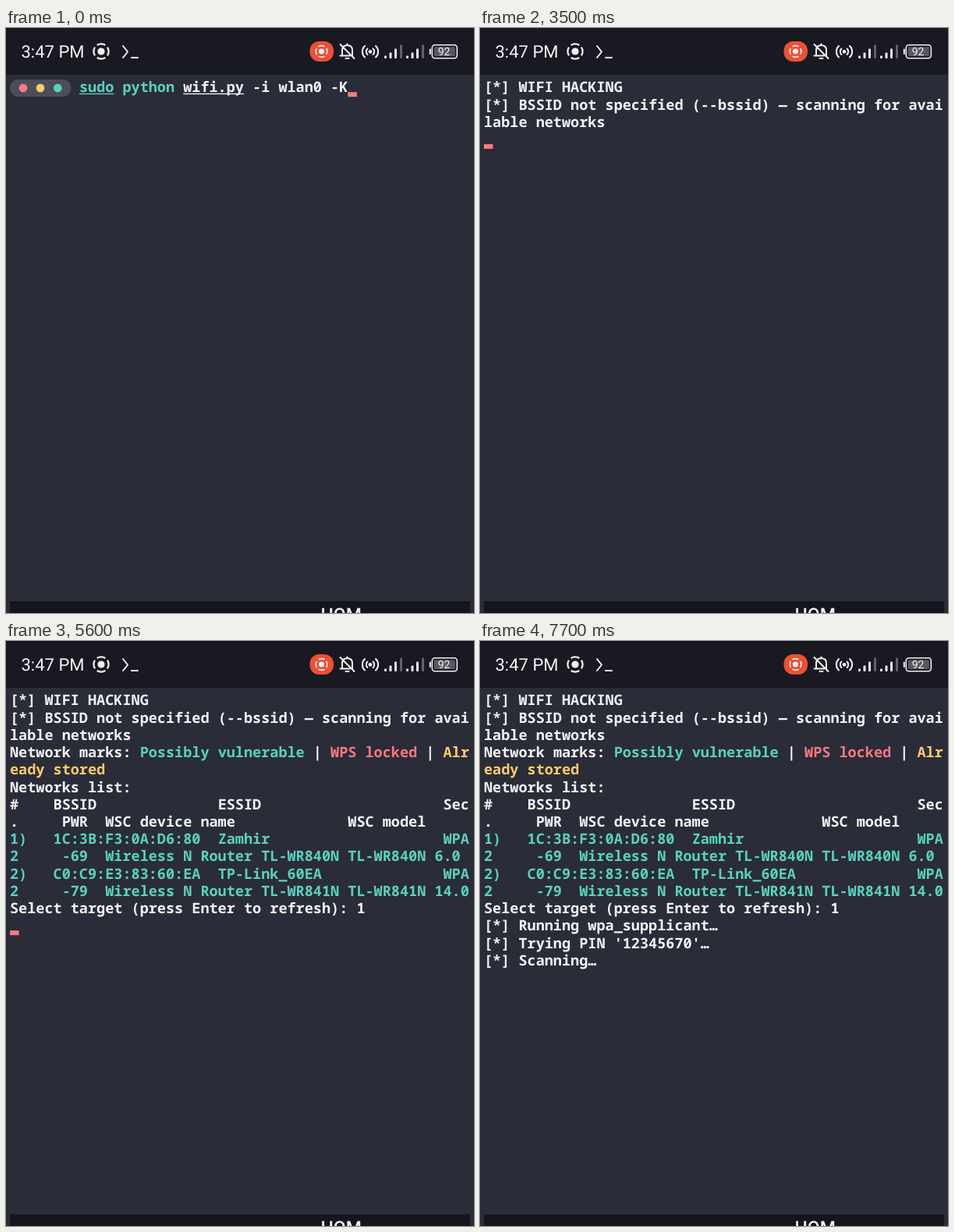
An HTML page for the animation above (8000 ms loop, 600 by 750 pixels).

```html
<!DOCTYPE html>
<html lang="en">
<head>
<meta charset="utf-8">
<title>Terminal session</title>
<style>
  html, body { margin: 0; width: 100%; height: 100%; overflow: hidden; background: #2a2c38; }
  svg { display: block; width: 600px; height: 750px; text-rendering: geometricPrecision; }
  .mono { font: 700 18.52px "Noto Sans Mono", "DejaVu Sans Mono", monospace; }
  .soft { font-weight: 600; }
  .ui { font-family: Roboto, "Noto Sans", sans-serif; fill: #f4f4f6; }
  .line { fill: none; stroke: #f0f0f2; stroke-width: 2; stroke-linecap: round; stroke-linejoin: round; }
</style>
</head>
<body>
<svg viewBox="0 0 600 750" xmlns="http://www.w3.org/2000/svg">
  <defs>
    <g id="record">
      <circle r="4.6" fill="#f0f0f2"/>
      <circle r="9.6" fill="none" stroke="#f0f0f2" stroke-width="2.2"
        pathLength="80" stroke-dasharray="15 5" stroke-dashoffset="7.5"/>
    </g>
    <g id="signal" fill="#f0f0f2">
      <rect x="0" y="35.5" width="3" height="3.5" rx="1"/>
      <rect x="6.5" y="31.5" width="3" height="7.5" rx="1"/>
      <rect x="13" y="26.5" width="3" height="12.5" rx="1"/>
      <rect x="20" y="21.5" width="3" height="17.5" rx="1" fill="#62626b"/>
    </g>
  </defs>

  <rect width="600" height="750" fill="#2a2c38"/>
  <rect width="600" height="60" fill="#191922"/>

  <!-- status bar -->
  <text class="ui" x="19.5" y="38" font-size="22">3:47 PM</text>
  <use href="#record" x="122" y="30"/>
  <path class="line" d="M150 23 L156 30.5 L150 38 M161 38 H169" stroke-width="2.2"/>
  <rect x="389.5" y="17" width="30.5" height="26" rx="12" fill="#ee5034"/>
  <use href="#record" transform="translate(404.5 30) scale(.76)"/>
  <g class="line">
    <path d="M431 34.5 V28 Q431 22.5 437.5 22 Q444 22.5 444 28 V35.5 M428.5 35.5 H441 M437.5 20.5 V22 M435.5 39 H439.5 M428.5 21 L446.5 39"/>
    <path d="M463.4 34 A5.3 5.3 0 0 1 463.4 26.5 M470.6 26.5 A5.3 5.3 0 0 1 470.6 34 M460 37.5 A10 10 0 0 1 460 23 M474 23 A10 10 0 0 1 474 37.5"/>
  </g>
  <circle cx="467" cy="30.3" r="2.4" fill="#f0f0f2"/>
  <use href="#signal" x="485"/>
  <use href="#signal" x="513"/>
  <rect x="542.8" y="26.5" width="2" height="7.5" rx="1" fill="#f0f0f2"/>
  <rect x="546.3" y="21.8" width="32" height="17" rx="3.5" fill="none" stroke="#f0f0f2" stroke-width="1.6"/>
  <rect x="548.8" y="24.3" width="27" height="12" rx="1.5" fill="#585861"/>
  <text class="ui" x="561.5" y="35.3" font-size="14" text-anchor="middle">92</text>

  <!-- key row -->
  <rect x="5" y="735" width="590" height="15" fill="#15151d"/>
  <text class="ui" x="403.5" y="759.8" font-size="23" font-weight="500">HOM</text>

  <g id="prompt">
    <rect x="5" y="66" width="78.5" height="22" rx="11" fill="#4b4d59"/>
    <circle cx="22" cy="77" r="5.4" fill="#fb7882"/>
    <circle cx="44" cy="77" r="5.4" fill="#ffcb6b"/>
    <circle cx="66.3" cy="77" r="5.4" fill="#58d2be"/>
  </g>
  <g id="intro"></g>
  <g id="list"></g>
  <g id="answer"></g>
  <g id="run"></g>
  <rect id="cursor" width="11.6" height="6" fill="#f97a80"/>
</svg>
<script>
const NS = "http://www.w3.org/2000/svg";
const LOOP = 8000, CELL = 11.11, ROW = 22.23;
const WHITE = "#f3f3f5", GREEN = "#58d2be", RED = "#fb7882", YELLOW = "#ffcb6b";
const $ = id => document.getElementById(id);
const colX = col => 5 + col * CELL;
const baseY = row => 82.4 + row * ROW;

function add(parent, tag, attrs) {
  const el = document.createElementNS(NS, tag);
  for (const key in attrs) el.setAttribute(key, attrs[key]);
  return parent.appendChild(el);
}

// Every word starts on its own terminal column.
function print(id, row, col, text, fill = WHITE, soft = false) {
  for (const word of text.matchAll(/\S+/g)) {
    add($(id), "text", {
      class: soft ? "mono soft" : "mono",
      x: colX(col + word.index), y: baseY(row), fill
    }).textContent = word[0];
  }
}

function underline(col, length, fill) {
  add($("prompt"), "rect", { x: colX(col), y: 83.8, width: length * CELL, height: 1.3, fill });
}

print("prompt", 0, 8, "sudo python", GREEN);
print("prompt", 0, 20, "wifi.py -i wlan0 -K");
underline(8, 4, GREEN);
underline(20, 7, WHITE);

print("intro", 0, 0, "[*] WIFI HACKING");
print("intro", 1, 0, "[*] BSSID not specified (--bssid) — scanning for avai");
print("intro", 2, 0, "lable networks");

print("list", 3, 0, "Network marks:");
print("list", 3, 15, "Possibly vulnerable", GREEN);
print("list", 3, 35, "|            |");
print("list", 3, 37, "WPS locked", RED, true);
print("list", 3, 50, "Alr", YELLOW, true);
print("list", 4, 0, "eady stored", YELLOW, true);
[
  "Networks list:",
  "#    BSSID              ESSID                     Sec",
  ".     PWR  WSC device name             WSC model"
].forEach((text, i) => print("list", 5 + i, 0, text, WHITE, true));
[
  "1)   1C:3B:F3:0A:D6:80  Zamhir                    WPA",
  "2     -69  Wireless N Router TL-WR840N TL-WR840N 6.0",
  "2)   C0:C9:E3:83:60:EA  TP-Link_60EA              WPA",
  "2     -79  Wireless N Router TL-WR841N TL-WR841N 14.0"
].forEach((text, i) => print("list", 8 + i, 0, text, GREEN, true));
print("list", 12, 0, "Select target (press Enter to refresh):", WHITE, true);
print("answer", 12, 40, "1", WHITE, true);
[
  "[*] Running wpa_supplicant…",
  "[*] Trying PIN '12345670'…",
  "[*] Scanning…"
].forEach((text, i) => print("run", 13 + i, 0, text, WHITE, true));

// When each block is on screen, in ms.
const blocks = {
  prompt: [0, 600],
  intro: [600, LOOP],
  list: [4000, LOOP],
  answer: [5200, LOOP],
  run: [5700, LOOP]
};

// Cursor: from, to, column, row.
const cursorSteps = [
  [0, 100, 39, 0],
  [100, 400, 0, 1],
  [1000, 1600, 0, 3],
  [2200, 2700, 0, 3],
  [3400, 4000, 0, 3],
  [4600, 5200, 40, 12],
  [5200, 5600, 41, 12],
  [5600, 5700, 0, 13],
  [5700, 6400, 0, 16],
  [7000, 7600, 0, 16]
];

const show = (el, on) => el.setAttribute("visibility", on ? "visible" : "hidden");
const within = (t, [from, to]) => t >= from && t < to;

function draw(t) {
  for (const id in blocks) show($(id), within(t, blocks[id]));
  const step = cursorSteps.find(s => within(t, s));
  show($("cursor"), step);
  if (step) {
    $("cursor").setAttribute("x", colX(step[2]));
    $("cursor").setAttribute("y", baseY(step[3]) - 0.2);
  }
}

const start = performance.now();
function tick() {
  draw((performance.now() - start) % LOOP);
  requestAnimationFrame(tick);
}
tick();
</script>
</body>
</html>
```
